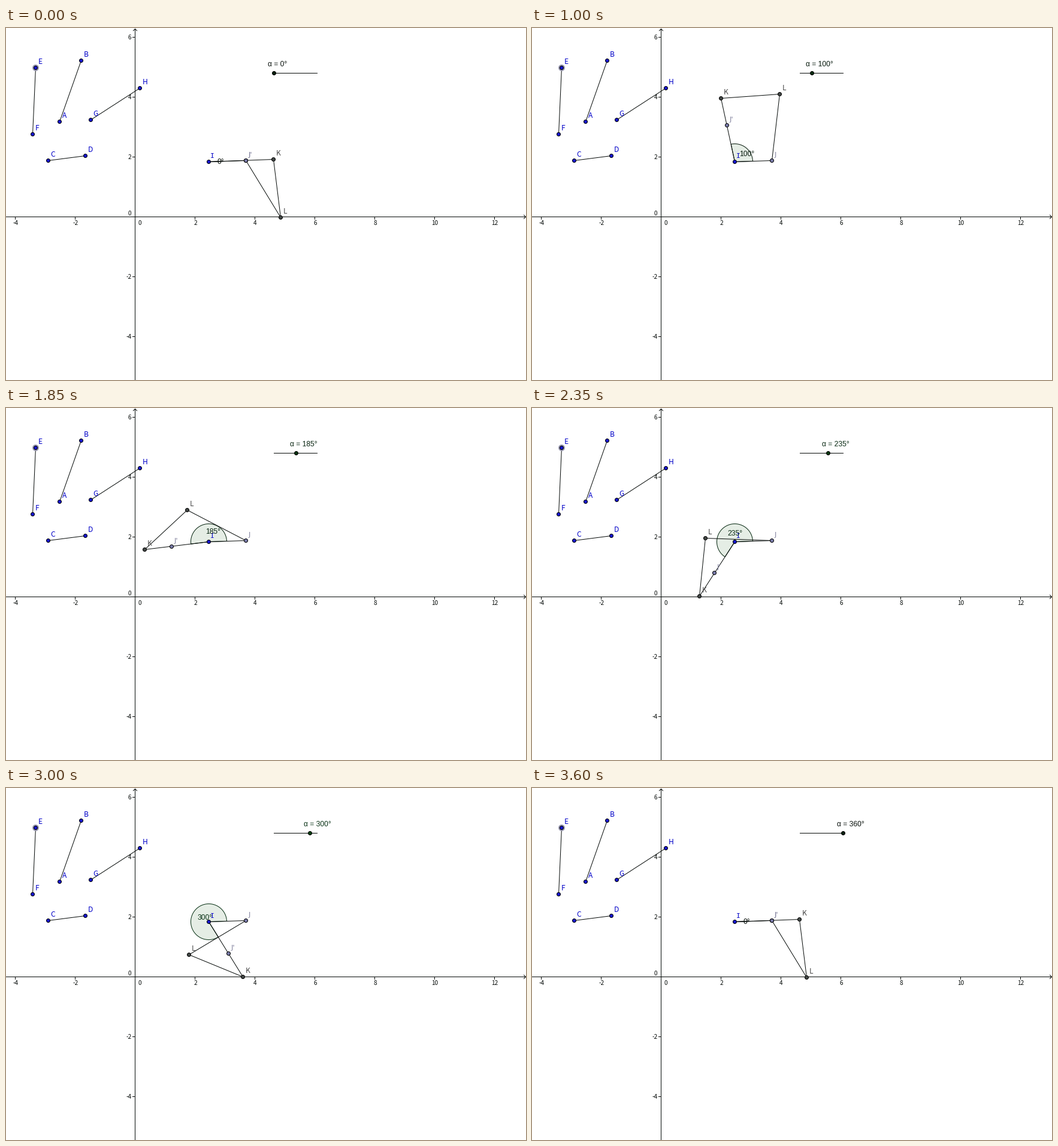
Write a matplotlib script that moves like this. It is 868x588 px and loops after 3.65 s.

```python
import numpy as np
import matplotlib.pyplot as plt
from matplotlib.animation import FuncAnimation
from matplotlib.patches import Polygon, Rectangle

W, H, DPI = 868, 588, 100
FRAMES, STEP_MS, STEP_DEG = 73, 50, 5
PX = 72 / DPI  # one pixel in points

BLUE, PALE, GREY = "#1616cf", "#7a7cab", "#434846"
BLUE_TEXT, PALE_TEXT, GREY_TEXT = "#0000c8", "#80809c", "#464646"
INK = "#050a08"
SANS, LETTERS = "Liberation Sans", "Noto Sans CJK JP"

fig = plt.figure(figsize=(W / DPI, H / DPI), dpi=DPI, facecolor="white")
ax = fig.add_axes([0, 0, 1, 1])
# Whole numbers fall on pixel centres; just under a half keeps snapping down.
ax.set_xlim(-0.49, W - 0.49)
ax.set_ylim(H - 0.49, -0.49)
ax.axis("off")


def stroke(xs, ys, z=3):
    return ax.plot(xs, ys, color=INK, lw=PX, zorder=z,
                   solid_capstyle="projecting")[0]


def write(x, y, s, px=12, color=INK, ha="left", font=SANS):
    return ax.text(x, y, s, fontsize=px * PX, color=color, ha=ha,
                   va="baseline", family=font, zorder=6)


class Point:
    """A dot with its letter up and to the right."""

    def __init__(self, name, fill, ink, xy=(0, 0)):
        self.dot, = ax.plot([], [], "o", ms=6 * PX, mfc=fill, mec="black",
                            mew=PX, zorder=5)
        font, px, self.dx = LETTERS, 12, 4
        if name[0] == "J":
            font, px = "DejaVu Sans", 11.5
        elif name == "I":
            font, px, self.dx = "DejaVu Sans Mono", 11.5, 2
        self.text = write(0, 0, name, px, ink, font=font)
        self.move(xy)

    def move(self, xy):
        x, y = xy
        self.dot.set_data([x], [y])
        self.text.set_position((x + self.dx, y - 6))


def draw_axes():
    stroke([0, W - 1], [315, 315], z=1)
    stroke([215, 215], [1, H], z=1)
    stroke([864, 867, 864], [312, 315, 318], z=1)
    stroke([212, 215, 218], [4, 1, 4], z=1)
    for n in range(-4, 13, 2):
        x = 215 + 50 * n
        if n:
            stroke([x, x], [315, 319], z=1)
        write(x + (0.5 if n else 8), 329, str(n), 10, ha="center",
              font=LETTERS)
    for n in range(-4, 7, 2):
        y = 315 - 50 * n
        if n:
            stroke([211, 215], [y, y], z=1)
        write(209, y + (4 if n else -2), str(n), 10, ha="right",
              font=LETTERS)


def polar(center, r, deg):
    t = np.radians(deg)
    return center + r * np.array([np.cos(t), -np.sin(t)])


def meet(p, q, rp, rq):
    """Crossing of two circles, on the right-hand side going from p to q."""
    d = np.hypot(*(q - p))
    u = (q - p) / d
    along = (d * d + rp * rp - rq * rq) / (2 * d)
    side = np.sqrt(rp * rp - along * along)
    return p + along * u + side * np.array([-u[1], u[0]])


draw_axes()

# The four given bars
ends = {"A": (89, 156), "B": (125, 54), "C": (70, 221), "D": (132, 213),
        "E": (49, 66), "F": (44, 177), "G": (141, 153), "H": (223, 100)}
bar = {}
for a, b in ("AB", "CD", "EF", "GH"):
    (x0, y0), (x1, y1) = ends[a], ends[b]
    stroke([x0, x1], [y0, y1])
    bar[a + b] = np.hypot(x1 - x0, y1 - y0)
ax.plot([49], [66], "o", ms=11 * PX, mfc="#9a9ab4", mec="none", zorder=4)
given = {n: Point(n, BLUE, BLUE_TEXT, xy) for n, xy in ends.items()}
window = Rectangle((40, 40), 18, 30, fc="none", ec="none")
ax.add_patch(window)
given["E"].text.set_clip_path(window)

# The linkage; joints are drawn at whole pixels
TILT, RADIUS = 2.1, 30
I = np.array([338.0, 223.0])
J = polar(I, bar["CD"], TILT)
sector = ax.add_patch(Polygon([I, I], closed=True, lw=PX, zorder=2))
stroke(*zip(I, np.rint(J)))
chain = stroke([], [])
Point("I", BLUE, BLUE_TEXT, I)
Point("J", PALE, PALE_TEXT, np.rint(J))
mid = Point("J'", PALE, PALE_TEXT)
K_point = Point("K", GREY, GREY_TEXT)
L_point = Point("L", GREY, GREY_TEXT)
angle_text = write(0, 0, "")

# The slider
stroke([447, 519], [75, 75])
knob, = ax.plot([], [], "o", ms=6 * PX, mec="black", mew=PX, zorder=5)
knob_text = write(0, 0, "")


def update(i):
    value = STEP_DEG * i
    turn = value % 360
    green = (0.02, 0.05 + 0.16 * turn / 360, 0.03 + 0.05 * turn / 360)

    K = polar(I, bar["AB"], TILT + turn)
    L = meet(J, K, bar["EF"], bar["GH"])
    mid.move(np.rint(polar(I, bar["CD"], TILT + turn)))
    K_point.move(np.rint(K))
    L_point.move(np.rint(L))
    chain.set_data(*np.rint([I, K, L, J]).T)

    arc = [polar(I, RADIUS, TILT + t) for t in np.linspace(0, turn, 90)]
    sector.set_xy([I, *arc])
    sector.set_facecolor("#e5ede5")
    sector.set_edgecolor(green)
    x, y = polar(I, RADIUS / 1.7, TILT + turn / 2)
    angle_text.set_position((x - 3.6, y + 4.6))
    angle_text.set_text(f"{turn}°")
    angle_text.set_color(green)

    x = np.rint(447 + value / 5)
    knob.set_data([x], [75])
    knob.set_markerfacecolor((0.03, 0.13 + 0.14 * turn / 360, 0.06))
    knob_text.set_position((x - 10.5, 64))
    knob_text.set_text(f"α = {value}°")
    knob_text.set_color(green)
    return []


anim = FuncAnimation(fig, update, frames=FRAMES, interval=STEP_MS,
                     init_func=lambda: update(0), repeat=True,
                     repeat_delay=0, blit=False)
plt.show()
```
